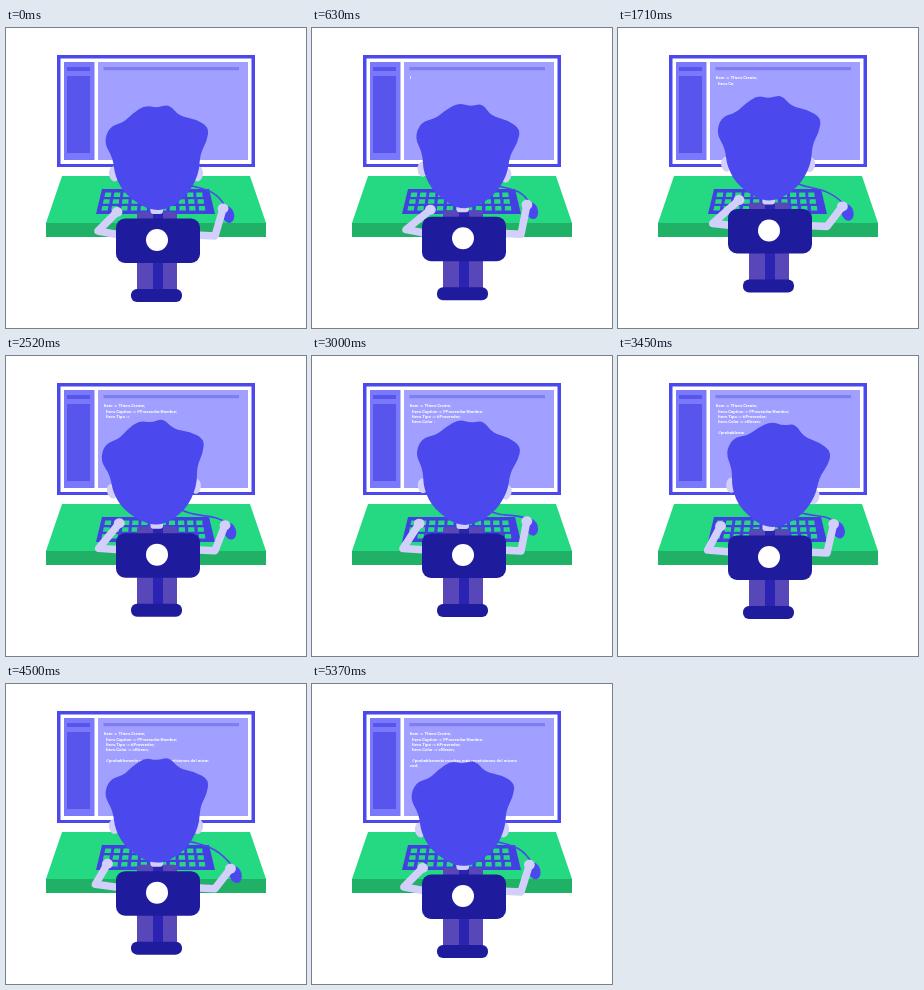
An HTML page with a canvas that plays this animation: 300 px wide and 300 px high, repeating every 5.4 s.

```html
<!DOCTYPE html>
<html lang="es">
<head>
<meta charset="utf-8">
<style>
html, body { margin: 0; width: 100%; height: 100%; overflow: hidden; background: #fff; }
canvas { display: block; width: 300px; height: 300px; }
</style>
</head>
<body>
<canvas id="stage"></canvas>
<script>
const LOOP = 5400;
const BLUE = '#4b49ee', NAVY = '#1e1b9c', SKIN = '#d2cffb', GREEN = '#24d982', SHIRT = '#5747b9';
const canvas = document.getElementById('stage');
const ctx = canvas.getContext('2d');
const scale = window.devicePixelRatio || 1;
canvas.width = canvas.height = 300 * scale;

const code = [
  'Item := TItem.Create;',
  ' Item.Caption := FProveedor.Nombre;',
  ' Item.Tipo := tiProveedor;',
  ' Item.Color := clGreen;',
  '',
  ' //probablemente muchas más repeticiones del mismo',
  'cod;'
];
const total = code.join('').length;

// Head angle in degrees at a few moments
const tilt = [[0, 0], [1100, 6.5], [2250, -5], [3400, 8], [4500, 0], [LOOP, 0]];

function smooth(from, to, t) {
  const u = Math.min(1, Math.max(0, (t - from) / (to - from)));
  return (1 - Math.cos(Math.PI * u)) / 2;
}

function at(keys, t) {
  const i = keys.findIndex(k => t < k[0]);
  const [t0, a] = keys[i - 1], [t1, b] = keys[i];
  return a + (b - a) * smooth(t0, t1, t);
}

function rect(x, y, w, h, color, r = 0) {
  ctx.fillStyle = color;
  ctx.beginPath();
  ctx.roundRect(x, y, w, h, r);
  ctx.fill();
}

function poly(points, color) {
  ctx.fillStyle = color;
  ctx.beginPath();
  points.forEach(p => ctx.lineTo(p[0], p[1]));
  ctx.closePath();
  ctx.fill();
}

function oval(x, y, rx, ry, color, angle = 0) {
  ctx.fillStyle = color;
  ctx.beginPath();
  ctx.ellipse(x, y, rx, ry, angle, 0, 2 * Math.PI);
  ctx.fill();
}

// Closed curve through the midpoints of the given points
function blob(points, color) {
  const n = points.length;
  const mid = i => {
    const a = points[i % n], b = points[(i + 1) % n];
    return [(a[0] + b[0]) / 2, (a[1] + b[1]) / 2];
  };
  ctx.fillStyle = color;
  ctx.beginPath();
  ctx.moveTo(...mid(0));
  for (let i = 1; i <= n; i++) ctx.quadraticCurveTo(...points[i % n], ...mid(i));
  ctx.fill();
}

function drawMonitor(t) {
  rect(51, 27, 198, 112, BLUE);
  rect(54.5, 30.5, 191, 105.5, '#fff');
  rect(58, 34, 30.5, 98, '#7a78fb');
  rect(61, 39, 23, 4, '#5755ec');
  rect(61, 48, 23, 77, '#5755ec');
  rect(92, 34, 150, 98, '#a19fff');
  rect(97.5, 39, 135.5, 3.2, '#7f7df2');

  let left = Math.round(total * smooth(440, 5000, t));
  ctx.fillStyle = '#fff';
  ctx.font = 'bold 4.35px Roboto, sans-serif';
  code.forEach((line, i) => {
    const indent = line.startsWith(' ') ? 1.3 : 0;
    ctx.fillText(line.slice(0, Math.max(0, left)), 97.7 + indent, 51.2 + i * 5.3);
    left -= line.length;
  });
}

function drawDesk() {
  poly([[56, 148], [244, 148], [260, 195], [40, 195]], GREEN);
  rect(40, 195, 220, 14, '#20b066');
  poly([[96, 161], [203, 161], [209, 186], [90, 186]], '#4340e2');
  for (let row = 0; row < 3; row++) {
    const y = 164.5 + row * 6.7;
    const x0 = 98.5 - row * 1.5, pitch = 9.1 + row * 0.28;
    for (let i = 0; i < 11; i++) {
      const x = x0 + i * pitch, lean = (x - 147) * 0.01;
      poly([[x + 0.8, y], [x + 6.8, y], [x + 6.8 + lean, y + 4.5], [x + 0.4 + lean, y + 4.5]], GREEN);
    }
  }
}

function drawArm(shoulder, elbow, hand) {
  ctx.strokeStyle = SKIN;
  ctx.lineWidth = 7.5;
  ctx.lineCap = ctx.lineJoin = 'round';
  ctx.beginPath();
  [shoulder, elbow, hand].forEach(p => ctx.lineTo(p[0], p[1]));
  ctx.stroke();
  oval(hand[0], hand[1], 5.4, 5, SKIN);
}

function drawMouse(x, y) {
  ctx.strokeStyle = BLUE;
  ctx.lineWidth = 1.6;
  ctx.beginPath();
  ctx.moveTo(174, 153);
  ctx.bezierCurveTo(190, 163, 207, 156, x - 2, y - 7);
  ctx.stroke();
  oval(x, y, 6, 8.6, BLUE, -0.3);
}

function drawHead(angle) {
  ctx.save();
  ctx.translate(151, 180);
  ctx.rotate(angle * Math.PI / 180);
  ctx.translate(-151, -180);
  oval(108, 146, 5, 7.5, SKIN, -0.15);
  oval(192, 146, 5, 7.5, SKIN, 0.15);
  blob([
    [126, 86], [139, 77], [151, 80], [163, 76], [173, 88], [189, 91], [203, 99],
    [201, 113], [194, 126], [193, 146], [180, 170], [151, 186],
    [121, 169], [109, 149], [107, 130], [98, 115], [103, 99], [118, 94]
  ], BLUE);
  ctx.restore();
}

function drawChair() {
  rect(110, 190.5, 84, 44.5, NAVY, 9);
  oval(151, 212, 11, 11, '#fff');
  rect(125, 261, 51, 13, NAVY, 6);
}

function draw(t) {
  ctx.setTransform(scale, 0, 0, scale, 0, 0);
  rect(0, 0, 300, 300, '#fff');
  drawMonitor(t);
  drawDesk();

  // The body rises once per loop, the left hand sways once, the mouse twice
  const phase = 2 * Math.PI * t / LOOP;
  const lift = -6.75 * (1 - Math.cos(phase));
  const sway = Math.sin(phase);
  const swing = Math.cos(2 * phase - 4.2);
  const mx = 224.5 + 5 * swing, my = 189 + lift + 5 * swing;

  drawMouse(mx, my);
  drawArm([114, 207 + lift], [92 + 3 * sway, 203 + 0.8 * lift], [111 + 11 * sway, 184 + 1.25 * lift]);
  drawArm([188, 207 + lift], [209, 208 + lift], [mx - 5, my - 6]);

  ctx.save();
  ctx.translate(0, lift);
  rect(131, 184, 40, 80, SHIRT, 3);
  rect(147, 184, 10, 80, '#2b24b2');
  rect(144.5, 174, 12.5, 12, SKIN, 3);
  drawHead(at(tilt, t));
  drawChair();
  ctx.restore();
}

const start = performance.now();
function tick() {
  draw((performance.now() - start) % LOOP);
  requestAnimationFrame(tick);
}
tick();
</script>
</body>
</html>
```
